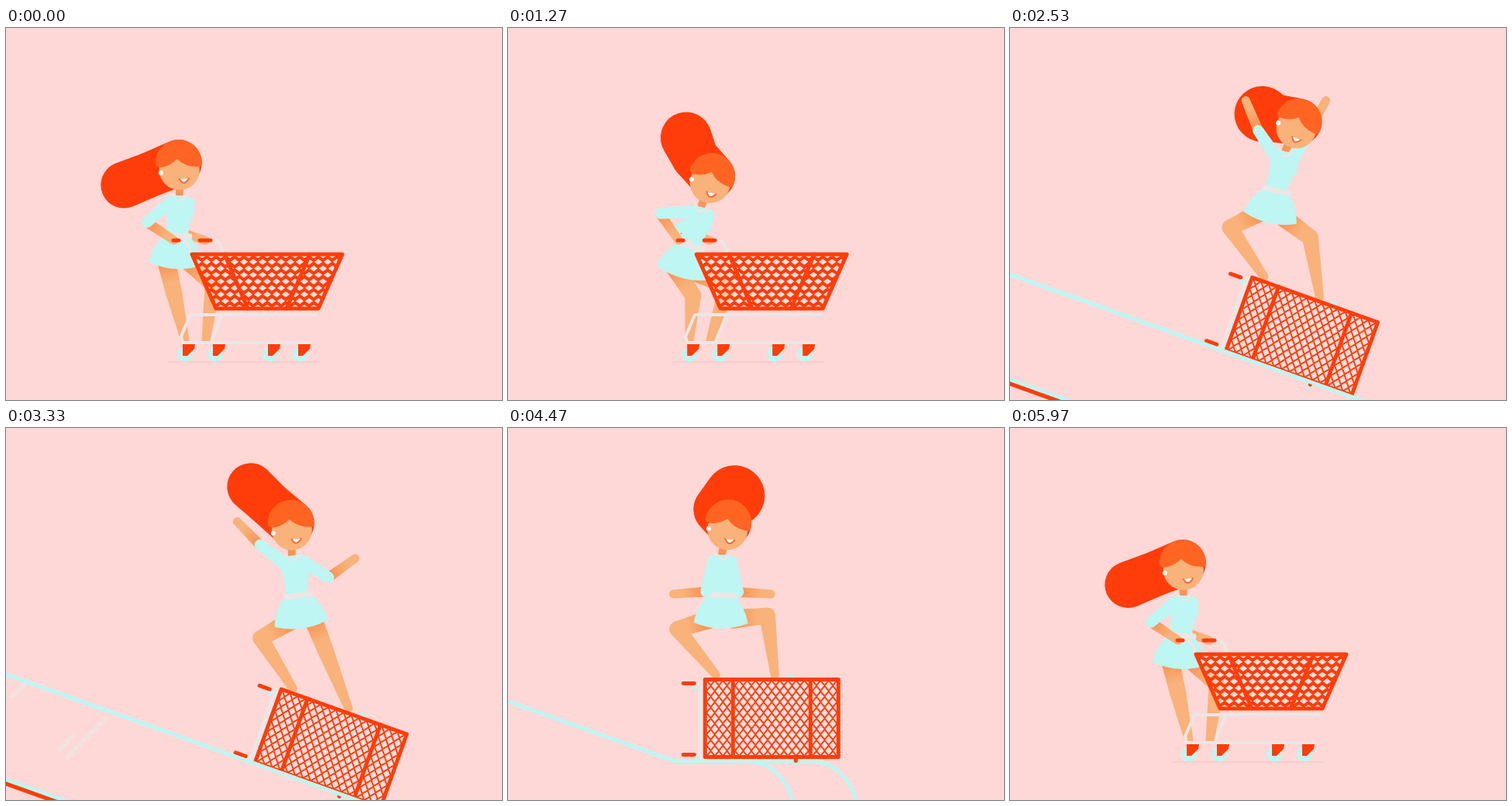
Animation of 640 by 480 pixels, one loop 6010 ms. Source, as an HTML page with a canvas:

```html
<!DOCTYPE html>
<html lang="en">
<head>
<meta charset="utf-8">
<title>Cart ride</title>
<style>
  html, body { margin: 0; width: 100%; height: 100%; overflow: hidden; background: #fdd8d7; }
  canvas { display: block; }
</style>
</head>
<body>
<canvas id="stage" width="640" height="480"></canvas>
<script>
const ctx = document.getElementById('stage').getContext('2d');
const LOOP = 6010, { PI, sin, cos, hypot, atan2, min, max, sqrt } = Math, RAD = PI / 180;
const PINK = '#fdd8d7', RED = '#ff3d0a', FRINGE = '#ff6423', AQUA = '#bdf6f2',
      SKIN = '#f8b27a', SHADE = '#fa9354', PALE = '#ebe7e6', GLINT = '#f3e3df';

// Key poses: time, waist from cart centre (x, y), lean, head tilt, hair direction, hair length.
const POSES = [
  [0, -116, -59, 3, 0, 158, 76],
  [730, -106, -55, 14, 13, 161, 79],
  [1770, -104, -38, 17, 28, 303, 43],
  [2530, -33, -188, 13, 26, 192, 48],
  [2900, -38, -198, 3, 12, 250, 74],
  [3330, -43, -197, -8, 0, 222, 70],
  [4470, -65, -159, 1, 13, 283, 36],
  [5080, -116, -59, 3, 2, 200, 55]
];
const KEYS = [...POSES, [LOOP, ...POSES[0].slice(1)]];

const clamp = v => min(1, max(0, v));
const mix = (a, b, u) => a + (b - a) * u;
const step = (a, b, t) => {
  const u = clamp((t - a) / (b - a));
  return u * u * (3 - 2 * u);
};
const turn = (x, y, a) => [x * cos(a) - y * sin(a), x * sin(a) + y * cos(a)];
const from = ([x, y], dx, dy, a) => {
  const [u, v] = turn(dx, dy, a);
  return [x + u, y + v];
};
const blend = (p, q, u) => [mix(p[0], q[0], u), mix(p[1], q[1], u)];

function poseAt(t) {
  const i = KEYS.findIndex(k => k[0] > t), a = KEYS[i - 1], b = KEYS[i];
  const u = step(a[0], b[0], t);
  return a.slice(1).map((v, j) => mix(v, b[j + 1], u));
}

// Handrail: top corner, slope, bottom corner, moving left at constant speed.
function railAt(t) {
  const slope = .358, d = t - 1770, tx = 583 - .79 * d, bx = tx + 1765;
  const y0 = min(318, 83.3 + .2828 * d + 20 * step(1900, 2500, t)) + 74 * step(3750, 5250, t);
  const height = x => y0 + slope * min(bx, max(tx, x));
  return { tx, bx, ty: height(tx), by: height(bx), height };
}

// The cart rolls upright, lies on its side on the rail, then hops back to the floor.
function cartAt(t, rail) {
  const lie = step(1850, 2280, t) * (1 - step(4500, 5040, t));
  const ride = clamp((t - 1850) / 2800);
  const sway = t < 1380 ? 14 * sin(PI * t / 690) ** 2
                        : 28 * step(4500, 5000, t) * (1 - step(5050, 5950, t));
  const x = 337 + 83 * sin(PI * ride) ** 2 + sway;
  const left = rail.height(x - 86), right = rail.height(x + 86);
  const hop = 65 * sin(PI * clamp((t - 4480) / 600));
  return {
    x, lie,
    y: mix(327, (left + right) / 2 - 55, lie) - hop,
    angle: atan2(right - left, 172) * lie
  };
}

function line(color, width, ...pts) {
  ctx.beginPath();
  for (let i = 0; i < pts.length; i += 2) ctx.lineTo(pts[i], pts[i + 1]);
  ctx.strokeStyle = color;
  ctx.lineWidth = width;
  ctx.stroke();
}

function disc(x, y, r, color) {
  ctx.beginPath();
  ctx.arc(x, y, r, 0, 7);
  ctx.fillStyle = color;
  ctx.fill();
}

// Capsule whose two ends may have different radii.
function capsule([ax, ay], ar, [bx, by], br, color) {
  const d = hypot(bx - ax, by - ay);
  if (d <= Math.abs(ar - br)) return ar > br ? disc(ax, ay, ar, color) : disc(bx, by, br, color);
  const th = atan2(by - ay, bx - ax), phi = Math.acos((ar - br) / d);
  ctx.beginPath();
  ctx.arc(ax, ay, ar, th + phi, th - phi + 2 * PI);
  ctx.arc(bx, by, br, th - phi, th + phi);
  ctx.fillStyle = color;
  ctx.fill();
}

function shaded([ax, ay], [bx, by]) {
  const g = ctx.createLinearGradient(ax, ay, bx, by);
  g.addColorStop(.1, SHADE);
  g.addColorStop(.7, SKIN);
  return g;
}

function local(x, y, angle, draw) {
  ctx.save();
  ctx.translate(x, y);
  ctx.rotate(angle);
  draw();
  ctx.restore();
}

// Middle joint of a two-part limb; bend gives the side and amount.
function joint(a, b, l1, l2, bend) {
  const dist = hypot(b[0] - a[0], b[1] - a[1]) || 1;
  const d = min(l1 + l2, max(dist, Math.abs(l1 - l2)));
  const along = (l1 * l1 - l2 * l2 + d * d) / (2 * d);
  const off = sqrt(max(0, l1 * l1 - along * along)) * bend;
  return from(a, along, off, atan2(b[1] - a[1], b[0] - a[0]));
}

function arm(shoulder, hand, bend) {
  const elbow = joint(shoulder, hand, 40, 42, bend);
  capsule(elbow, 6.5, hand, 5.5, shaded(elbow, hand));
  capsule(shoulder, 8, elbow, 7, AQUA);
}

function leg(hip, foot, shin, bend) {
  const knee = joint(hip, foot, 45, shin, bend);
  capsule(knee, 10.5, foot, 5.5, SKIN);
  capsule(hip, 12, knee, 10.5, shaded(hip, knee));
}

function face(x, y, angle) {
  local(x, y, angle, () => {
    disc(0, 6, 26, SKIN);
    ctx.beginPath();
    ctx.arc(-1, -3, 30, PI, 0);
    ctx.quadraticCurveTo(29, 3, 24, 2);
    ctx.quadraticCurveTo(6, 2, -3, -8);
    ctx.quadraticCurveTo(-13, 2, -26, 3);
    ctx.quadraticCurveTo(-31, 2, -31, -3);
    ctx.fillStyle = FRINGE;
    ctx.fill();
    ctx.beginPath();
    ctx.moveTo(0, 18);
    ctx.lineTo(12, 17);
    ctx.quadraticCurveTo(6, 28, 0, 18);
    ctx.fillStyle = '#fff';
    ctx.fill();
    ctx.beginPath();
    ctx.moveTo(0, 18);
    ctx.quadraticCurveTo(6, 28, 12, 17);
    ctx.strokeStyle = '#f4682f';
    ctx.lineWidth = 2;
    ctx.stroke();
    disc(-24, 10, 3, '#fff');
  });
}

function hair(root, direction, length) {
  const bunch = max(0, 72 - length), end = from(root, length, 0, direction);
  const mid = blend(root, end, .5), r = 30 + bunch * .25;
  mid[0] -= bunch * .45;
  capsule(root, 30, mid, 29 + bunch * .1, RED);
  capsule(mid, 29 + bunch * .1, end, r, RED);
}

function dress(neck, waist, lean) {
  local(...neck, lean, () => {
    ctx.beginPath();
    ctx.moveTo(-8, 2);
    ctx.quadraticCurveTo(-18, 6, -17, 16);
    ctx.quadraticCurveTo(-13, 32, -15, 56);
    ctx.lineTo(15, 56);
    ctx.quadraticCurveTo(12, 38, 20, 26);
    ctx.quadraticCurveTo(22, 7, 8, 2);
    ctx.fillStyle = AQUA;
    ctx.fill();
    ctx.beginPath();
    ctx.arc(0, 0, 8, .1, 3);
    ctx.strokeStyle = PALE;
    ctx.lineWidth = 3;
    ctx.stroke();
  });
  local(...waist, lean, () => {
    ctx.beginPath();
    ctx.moveTo(-16, 0);
    ctx.quadraticCurveTo(-32, 15, -35, 36);
    ctx.quadraticCurveTo(0, 50, 35, 36);
    ctx.quadraticCurveTo(31, 15, 16, 0);
    ctx.fillStyle = AQUA;
    ctx.fill();
    line(PALE, 7, -15, 0, 16, 0);
  });
}

function girl(t, cart) {
  const [dx, dy, leanDeg, tiltDeg, hairDeg, hairLength] = poseAt(t);
  const lean = leanDeg * RAD, tilt = tiltDeg * RAD, { lie } = cart;
  const waist = [cart.x + dx, cart.y + dy];
  const neck = from(waist, 0, -54, lean), hem = from(waist, 0, 37, lean);
  const head = from(neck, 0, -37, tilt);
  const side = mix(1, -1, lie);

  // Hands hold the handle, or balance in the air during the ride.
  const ride = clamp((t - 2530) / 1940);
  const raise = mix(-51, 40, ride), twist = 18 * sin(PI * ride);
  const onCart = (x, y) => from([cart.x, cart.y], x, y, cart.angle);
  const hand = (s, grip) => {
    const a = (raise + s * twist) * RAD;
    return blend(onCart(grip, -53), [neck[0] + s * 82 * cos(a), neck[1] + 82 * sin(a)], lie);
  };
  const foot = (floor, edge) => onCart(mix(floor, edge, lie), mix(76, -56, lie));

  arm(from(neck, 12, 11, lean), hand(1, -80), 1);
  hair(from(head, -1, -3, tilt), hairDeg * RAD, hairLength);
  leg(from(hem, 15, -6, lean), foot(-79, 4), mix(73, 77, lie), -1);
  leg(from(hem, -13, -6, lean), foot(-106, -72), mix(58, 77, lie), -side);
  capsule(from(head, 0, 10, tilt), 5, neck, 5, SHADE);
  dress(neck, waist, lean);
  arm(from(neck, -11, 11, lean), hand(-1, -120), side);
  face(...head, tilt);
}

function chassis() {
  ctx.translate(-337, -327);
  line('#f6cdca', 2, 210, 431, 404, 431);
  line(PALE, 4, 400, 370, 238, 370, 226, 398, 228, 406, 392, 406);
  line(PALE, 4, 279, 370, 265, 404);
  for (const x of [231, 270, 341, 380]) {
    disc(x, 421, 10, AQUA);
    disc(x, 421, 4, PALE);
    ctx.fillStyle = RED;
    ctx.fill(new Path2D(`M${x - 3} 408h16l-1 6-9 9h-6z`));
  }
  for (const [a, b] of [[216, 223], [250, 264]]) {
    ctx.strokeStyle = PALE;
    ctx.lineWidth = 4;
    ctx.stroke(new Path2D(`M${b} 274q12 -2 16 16`));
    line(RED, 5, a, 274, b, 274);
  }
}

function sideParts() {
  line(PALE, 8, -91, -46, -91, 48);
  for (const y of [-45, 47]) {
    line(PALE, 5, -101, y, -82, y);
    line(RED, 5, -114, y, -100, y);
    disc(-97, y + 5, 3, AQUA);
  }
  disc(24, -54, 3.5, AQUA);
  disc(31, 57, 3.5, AQUA);
  line(RED, 5, 31, 50, 31, 55);
}

function faded(alpha, draw) {
  if (alpha <= 0) return;
  ctx.save();
  ctx.globalAlpha = alpha;
  draw();
  ctx.restore();
}

function drawCart({ x, y, angle, lie }) {
  const top = mix(97, 86, lie), low = mix(66, 86, lie), half = mix(35, 50, lie);
  local(x, y, angle, () => {
    faded(1 - 2 * lie, chassis);
    faded(2 * lie - 1, sideParts);
    const basket = new Path2D(`M${-top} ${-half}H${top}L${low} ${half}H${-low}Z`);

    // Staggered rows of see-through holes in a red sheet.
    const mesh = new Path2D(basket), holes = new Path2D();
    const w = mix(5, 4.2, lie), h = mix(3.7, 5, lie);
    const pitch = mix(12, 10.5, lie), row = mix(8.4, 7, lie);
    for (let i = -8; i <= 8; i++) {
      for (let j = -10; j <= 10; j++) {
        const cx = (j + (i & 1) / 2) * pitch, cy = i * row;
        holes.addPath(new Path2D(`M${cx - w} ${cy}L${cx} ${cy - h}L${cx + w} ${cy}L${cx} ${cy + h}Z`));
      }
    }
    mesh.addPath(holes);
    ctx.save();
    ctx.clip(basket);
    ctx.fillStyle = RED;
    ctx.fill(mesh, 'evenodd');
    ctx.fillStyle = 'rgba(245,232,228,.5)';
    ctx.fill(holes);
    ctx.restore();
    for (const s of [-1, 1]) line(RED, 5, s * mix(55, 50, lie), -half, s * mix(25, 50, lie), half);
    ctx.strokeStyle = RED;
    ctx.lineWidth = 5;
    ctx.stroke(basket);
  });
}

function mirrored(x, y, dir, draw) {
  ctx.save();
  ctx.translate(x, y);
  ctx.scale(dir, 1);
  draw();
  ctx.restore();
}

function loopEnd(flat, start) {
  ctx.beginPath();
  ctx.moveTo(start, 0);
  ctx.lineTo(-flat, 0);
  ctx.ellipse(-flat, 66, 62, 66, 0, -PI / 2, PI / 2, true);
  ctx.lineTo(-flat + 30, 132);
  ctx.strokeStyle = AQUA;
  ctx.lineWidth = 5;
  ctx.stroke();
}

function landing(x, y, dir, flat) {
  mirrored(x, y, dir, () => {
    loopEnd(flat, 0);
    const bend = -10 * dir, edge = 22 - flat;
    ctx.fillStyle = RED;
    ctx.fillRect(edge - 2, 129, bend - edge + 2, 10);
    ctx.beginPath();
    ctx.roundRect(edge + 5, 114, flat - 38, 17, [9, 9, 0, 0]);
    ctx.fill();
    line(AQUA, 5, -50, 132, bend, 132);
  });
}

function railBack({ tx, ty, bx, by, height }) {
  mirrored(tx + 82, ty, 1, () => loopEnd(253, -82));
  mirrored(bx + 82, by, -1, () => loopEnd(92, 0));
  const glint = (x, y, size) => line(GLINT, 6, x, y, x + size, y - size);
  glint(tx - 143, ty + 101, 22);
  for (const x of [tx + 754, tx + 1300]) {
    const y = height(x);
    glint(x - 25, y + 70, 49);
    glint(x - 35, y + 60, 17);
    glint(x - 95, y - 10, 15);
  }
}

function railFront({ tx, ty, bx, by }) {
  line(RED, 8, tx - 10, ty + 136, bx - 10, by + 136);
  line(AQUA, 5, tx - 10, ty + 132, bx - 10, by + 132);
  landing(tx, ty, 1, 253);
  landing(bx, by, -1, 92);
  line(AQUA, 5, tx, ty, bx, by);
}

function frame(now) {
  const t = now % LOOP, rail = railAt(t), cart = cartAt(t, rail);
  ctx.fillStyle = PINK;
  ctx.fillRect(0, 0, 640, 480);
  ctx.lineCap = ctx.lineJoin = 'round';
  railBack(rail);
  girl(t, cart);
  drawCart(cart);
  railFront(rail);
  requestAnimationFrame(frame);
}
requestAnimationFrame(frame);
</script>
</body>
</html>
```
